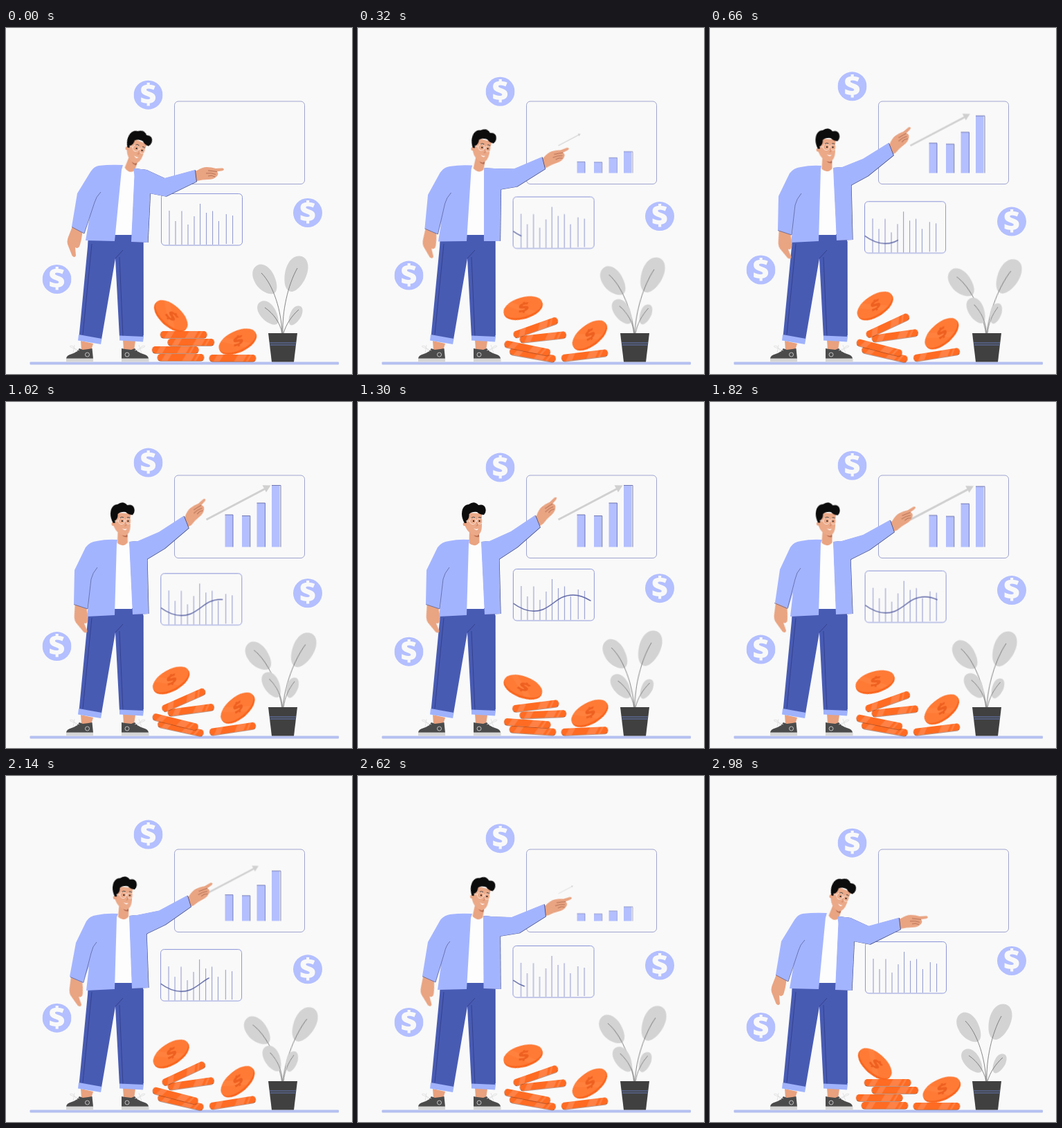
Write an HTML page without scripts that moves like this. It is 500 px wide and 500 px high and loops after 3 s.

```html
<!DOCTYPE html>
<html lang="en">
<head>
<meta charset="utf-8">
<title>Growth presentation</title>
<style>
html, body { margin: 0; width: 100%; height: 100%; overflow: hidden; background: #f9f9f9; }
svg { display: block; width: 100vw; height: 100vh; }
text { font-family: "Open Sans", Arial, sans-serif; font-weight: 800; text-anchor: middle; }

/* floating pieces */
.bob { animation: bob .75s cubic-bezier(.364,0,.636,1) infinite alternate; }
@keyframes bob { to { transform: translate(var(--x, 0px), var(--y)); } }

/* chart */
.bars { transform-origin: 316px 209.5px; animation: rise 3s infinite; }
.arrow { transform-origin: 289.5px 170px; animation: grow 3s infinite; }
@keyframes rise {
  0% { transform: scaleY(0); animation-timing-function: cubic-bezier(.45,0,.35,1); }
  30%, 55.7% { transform: none; animation-timing-function: cubic-bezier(.52,0,.64,1); }
  100% { transform: scaleY(0); }
}
@keyframes grow {
  0% { transform: scale(0); animation-timing-function: cubic-bezier(.45,0,.35,1); }
  30%, 55.7% { transform: none; animation-timing-function: cubic-bezier(.52,0,.64,1); }
  100% { transform: scale(0); }
}
.wave { stroke-dasharray: 1 2; stroke-dashoffset: 1; animation: draw 1.5s cubic-bezier(.364,0,.636,1) infinite alternate; }
@keyframes draw { to { stroke-dashoffset: 0; } }

/* coins and plant */
.coin { animation: toss 1.5s cubic-bezier(.364,0,.636,1) infinite; }
@keyframes toss {
  31%, 63% { transform: translate(0, var(--y)) rotate(var(--r)); }
}
.leaf { transform-origin: 400px 441px; animation: sway 1.5s cubic-bezier(.364,0,.636,1) infinite; }
@keyframes sway { 42.7%, 57.3% { transform: rotate(var(--r)); } }

/* man */
.man * { animation: 3s cubic-bezier(.4,.2,.6,.8) infinite; }
.man .head { animation-name: head; transform-origin: 168px 203px; }
.man .hand { animation-name: hand; transform-origin: 274px 213px; }
.man .rest { animation-name: rest; transform-origin: 103px 292px; }
.man .sleeve { animation-name: sleeve; }
.man .left { animation-name: left; }
.man .right { animation-name: right; }
.man .fold { animation-name: fold; }
@keyframes head {
  0%, 99.6%, 100% { transform: translate(11px, .5px) rotate(20deg); }
  22% { transform: translate(1px, 0) rotate(2deg); }
  43.3% { transform: none; }
  60.7% { transform: translate(1px, 0) rotate(2.5deg); }
  71.3% { transform: translate(1.5px, 0) rotate(3.5deg); }
  87.3% { transform: translate(5px, 0) rotate(11deg); }
}
@keyframes hand {
  0%, 99.6%, 100% { transform: none; }
  22% { transform: translate(-12px, -38px) rotate(-36.5deg); }
  43.3% { transform: translate(-13px, -42px) rotate(-40deg); }
  60.7% { transform: translate(-9px, -34px) rotate(-28.5deg); }
  71.3% { transform: translate(-8.5px, -32px) rotate(-26.5deg); }
  87.3% { transform: translate(-3px, -19px) rotate(-13.5deg); }
}
@keyframes rest {
  0%, 99.6%, 100% { transform: none; }
  22%, 43.3% { transform: translate(5px, 3px) rotate(-18deg); }
  60.7% { transform: translate(0, 2px) rotate(-14deg); }
  71.3% { transform: translate(-1px, 2px) rotate(-14deg); }
  87.3% { transform: translate(-1px, 1.5px) rotate(-10deg); }
}
@keyframes sleeve {
  0%, 99.6%, 100% { d: path("M184 203L203 205L229 217L273 205L275 222L231 243.5L208 239L190 240Z"); }
  22% { d: path("M184 202L191 201L221 189L258 166L265 184L228 214L204 227L190 240Z"); }
  43.3% { d: path("M180 202L190 201L221 187L256 163.5L263 181L230 210L204 227L190 238Z"); }
  60.7% { d: path("M183 202L190 201L221 192L260 170.5L266 188L230 214L204 227L190 240Z"); }
  71.3% { d: path("M183 202L189 201L221 194.5L262 172.5L267 189L230 215L204 227.5L190 240Z"); }
  87.3% { d: path("M184 202.5L190 203L222 204L269 185L271 203L233 227L205 231.5L190 240Z"); }
}
@keyframes left {
  0%, 99.6%, 100% { d: path("M134 199Q150 197 169 198L167 205L157 308L115 307L121 272L113 297L95 287L103 239L122 208Q127 200 134 199Z"); }
  22%, 43.3% { d: path("M131 201Q145 198 161 199L160 204L157 308L117 310L120 288L118 299L98 292L99 243L115 210Q121 202 131 201Z"); }
  60.7% { d: path("M131 201Q145 198 162 199L160 204L157 308L116 310L120 275L113 298L94 290L101 242L116 210Q121 202 131 201Z"); }
  71.3% { d: path("M131 201Q145 198 162 199L160 204L157 308L116 310L120 275L111 299L92 290L101 241L116 210Q121 202 131 201Z"); }
  87.3% { d: path("M133 200Q148 198 165 199L163 205L157 308L115 309L120 273L112 298L93 289L101 240L119 208Q125 201 133 200Z"); }
}
@keyframes right {
  0%, 99.6%, 100% { d: path("M186 203L203 205L209 228L205 310L181 309Z"); }
  22%, 43.3% { d: path("M178 202L190 201L204 226L206 306L183 307Z"); }
  60.7%, 71.3% { d: path("M178 202L189 201L203 226L206 306L182 307Z"); }
  87.3% { d: path("M181 202L192 203L205.5 230L206 308L181.5 307Z"); }
}
@keyframes fold {
  0%, 99.6%, 100% { d: path("M137 237Q130 244 128 252L113 297L95 287.5"); }
  22%, 43.3% { d: path("M132 239Q125 247 123 256L118 299L98 292.5"); }
  60.7%, 71.3% { d: path("M131 240Q125 246 123 256L112 298.5L93 290.5"); }
  87.3% { d: path("M133 239Q127 245 125 255L112 298L93 289.5"); }
}
</style>
</head>
<body>
<svg viewBox="0 0 500 500">
<defs>
  <g id="dollar">
    <circle r="21" fill="#b3bfff"/>
    <text y="13.2" font-size="41" fill="#f9f9f9">$</text>
  </g>
  <g id="flat">
    <rect x="-33.5" y="-4.5" width="67" height="10" rx="4.5" fill="#7a3216"/>
    <rect x="-33.5" y="-5" width="67" height="10" rx="4.5" fill="#ff6b22"/>
    <path d="M-22 -5h9l-6 10h-9zM8 -5h13l-6 10h-13zM25 -5h3l-6 10h-3z" fill="#ff8145"/>
  </g>
  <g id="disc">
    <ellipse cy="1.5" rx="29" ry="14.4" fill="#f9651d"/>
    <ellipse cy="-1.2" rx="28.8" ry="14" fill="#ff7a35"/>
    <path d="M-14 -13L-22 -10 6 12 16 10z" fill="#ff8846" opacity=".5"/>
    <text transform="translate(-1 5.5) skewX(-18) scale(1.1 .7)" font-size="26" fill="#ee6020">$</text>
  </g>
  <clipPath id="panel"><rect x="224.5" y="239.5" width="117" height="74.5" rx="5"/></clipPath>
</defs>

<rect x="34.5" y="482.5" width="446.5" height="4" rx="1" fill="#b5c0f0"/>

<!-- large panel -->
<rect x="243.5" y="106" width="188" height="119.5" rx="5.5" fill="none" stroke="#959bcb" stroke-width=".9"/>
<g class="bars">
  <path d="M316.5 163h11.5v46.5h-11.5zM341 164.5h11.5v45h-11.5zM362.5 146h11.5v63.5h-11.5zM384 120.5h11.5v89h-11.5z" fill="#b3bfff"/>
  <path d="M316.5 163h11.5v46.5M341 164.5h11.8v45M362.5 146h12v63.5M384 120.5h13v89" fill="none" stroke="#575d9d" stroke-width=".8"/>
</g>
<g class="arrow">
  <path d="M289.5 170L376 124.5" stroke="#d0d0d0" stroke-width="3"/>
  <path d="M382.5 120.5L370.5 120.2 376 130.5z" fill="#d0d0d0"/>
</g>

<!-- small panel -->
<g class="bob" style="--x:-1px;--y:11.7px">
  <rect x="224.5" y="239.5" width="117" height="74.5" rx="5" fill="none" stroke="#8c96d8"/>
  <path d="M236 264V313M245 279V313M254 264.5V313M263 284V313M272 272V313M280.6 254V313M289.6 267V313M298.6 264.5V313M307.4 279V313M318.3 269V312M327.6 271V312" stroke="#8d95cd"/>
  <path class="wave" clip-path="url(#panel)" pathLength="1" d="M224.5 289C238 299 253 303 267 298C284 291 290 277 311 277C323 277 333 283 341 288" fill="none" stroke="#5a62a3" stroke-width="1.5"/>
</g>

<g transform="translate(205.5 96.7)"><g class="bob" style="--y:-12.8px"><use href="#dollar"/></g></g>
<g transform="translate(436 267)"><g class="bob" style="--y:13px"><use href="#dollar"/></g></g>
<g transform="translate(73.5 363)"><g class="bob" style="--y:-14px"><use href="#dollar"/></g></g>

<!-- coins -->
<g transform="translate(252.5 476)"><g class="coin" style="--y:-4.5px;--r:13deg"><use href="#flat"/></g></g>
<g transform="translate(244.8 465)"><g class="coin" style="--y:-3px;--r:14.5deg"><use href="#flat"/></g></g>
<g transform="translate(267.3 454)"><g class="coin" style="--y:-9.5px;--r:-8deg"><use href="#flat"/></g></g>
<g transform="translate(256.7 443)"><g class="coin" style="--y:-13px;--r:-25deg"><use href="#flat"/></g></g>
<g transform="translate(238.5 415.9)"><g class="coin" style="--y:-14.5px;--r:-75deg"><g transform="rotate(42)"><use href="#disc"/></g></g></g>
<g transform="translate(327.5 477)"><g class="coin" style="--y:-5px;--r:-9deg"><use href="#flat"/></g></g>
<g transform="translate(334.7 453)"><g class="coin" style="--y:-11.5px;--r:-16deg"><g transform="rotate(-25)"><use href="#disc"/></g></g></g>

<!-- plant -->
<g fill="none" stroke="#6a6a6a" stroke-width=".8">
  <g class="leaf" style="--r:-8.5deg">
    <path d="M363 343C372 338 384 347 389 362C393 373 392 382 386 384C378 386 364 378 359 366C354 356 356 347 363 343z" fill="#d3d3d3" stroke="none"/>
    <path d="M399 441C398 410 387 372 369 354"/>
  </g>
  <g class="leaf" style="--r:8.6deg">
    <path d="M424 329.5C434 330 438 340 436 351C433 366 422 380 413 381C404 381 401 369 403 355C405 341 413 329 424 329.5z" fill="#d3d3d3" stroke="none"/>
    <path d="M400 441C399 410 407 372 421 347"/>
  </g>
  <g class="leaf" style="--r:11deg">
    <path d="M369 395C376 392 385 398 390 409C394 418 395 426 391 428C385 431 373 424 367 415C361 406 362 398 369 395z" fill="#d3d3d3" stroke="none"/>
    <path d="M399 441C396 426 387 413 374 404"/>
  </g>
  <g class="leaf" style="--r:-11deg">
    <path d="M423 401.5C429 402 430 408 427 416C423 424 416 430 412 429.5C407 428 408 419 411 412C414 405 418 401 423 401.5z" fill="#d3d3d3" stroke="none"/>
    <path d="M401 441C405 428 412 417 423 407"/>
  </g>
</g>
<path d="M379 441H421L416 482.5H384z" fill="#404040"/>
<path d="M381 455H419M381.5 458H418.5" stroke="#6a7fc4" stroke-width=".9"/>

<!-- legs and shoes -->
<path d="M108 452L126 456 123 466H109zM169 450L187 452 185 466H170z" fill="#e9a17e"/>
<path d="M106 463L111 465 119 464 124.5 463 126 478H87Q87 473 95 471Q102 469 106 463zM167 463L172 464 181 465 186 463Q191 469 198 471Q206 473 206 478H167z" fill="#4b4b4b"/>
<path d="M87 477.5H126V482.5H87zM167 477.5H206.5V482.5H167z" fill="#d6d6d6"/>
<g fill="none" stroke="#dedede" stroke-width=".8">
  <circle cx="117.5" cy="472" r="3"/><circle cx="175" cy="472" r="3"/>
  <path d="M106 466L93 461Q91 458 97 460L103 468M97 470L99 458M186 466L200 461Q203 458 196 460L190 468M196 470L192 458"/>
</g>
<path d="M119 298L118 316 105.5 446 138 450 158 333 164 447 198.5 447 198 298z" fill="#485bb3"/>
<path d="M124 312L111 443M164 331L169 446M198.2 308V444M158 333L169 321" fill="none" stroke="#2e3c84" stroke-width=".8"/>
<path d="M105 443L138.5 449 137 457 104 451.5zM164 444.5L199 446 198 453.5 164 451.5z" fill="#9fb2fb"/>

<!-- upper body -->
<g class="man">
  <path class="rest" d="M97 284L90 302Q87 309 90 315L95.5 329Q99 333 101 329L100 317Q105 320 107 313L109 305 111 292z" fill="#e9a482"/>
  <path d="M159 203H187L182 299H157z" fill="#fdfdfd"/>
  <g class="head">
    <path d="M161 184L175 188 175.5 203Q169 211 160.5 204z" fill="#e9a482"/>
    <path d="M167 192Q171 194 175 191V195Q170 196 167 192z" fill="#b96e50"/>
    <path d="M156 160L179 161V179Q179 190 172 193.5Q160 192 155 180z" fill="#eba988"/>
    <circle cx="154.5" cy="176.5" r="2.8" fill="#e9a482"/>
    <path d="M154 175Q148 165 151 155Q154 148 160 148Q168 142 174 149Q182 147 184 153Q186 159 182 163Q176 163 172 159Q165 158 160.5 162Q161 168 157.5 171L156.5 175z" fill="#0c0c0c"/>
    <g fill="none" stroke="#fbe9df" stroke-width=".9">
      <circle cx="166" cy="172" r="4.6"/><circle cx="176" cy="172" r="4.2"/><path d="M156 172H161.5"/>
    </g>
    <path d="M164 167.5Q166 165.5 169 167M174 167Q176 166 178 167.5" fill="none" stroke="#222" stroke-width=".9"/>
    <circle cx="167" cy="172" r="1.1"/><circle cx="175.5" cy="172" r="1.1"/>
    <path d="M171.5 173L173 178.5 170.5 179" fill="none" stroke="#c97d5e" stroke-width=".8"/>
    <path d="M167 182.5Q170 184.5 174 183Q172 187.5 167 182.5z" fill="#fff"/>
  </g>
  <path class="left" fill="#a3b4ff"/>
  <path class="fold" fill="none" stroke="#59649f" stroke-width=".8"/>
  <g class="hand">
    <path d="M268 207L276 206Q284 201 290 201Q297 201 303 203L313 202.5Q317 204.5 313 206.2L305 207.5Q308 211 304.5 214.5Q300 219 292 219Q284 219 276 221L268 220z" fill="#e9a482"/>
    <path d="M292 206L305 207.5M289 210Q297 209 303 211.5M292 214Q297 212 302 215" fill="none" stroke="#9c5b42" stroke-width=".7"/>
  </g>
  <path class="sleeve" transform="translate(.9 .3)" fill="#3f4876"/>
  <path class="right" transform="translate(.6 0)" fill="#3f4876"/>
  <path class="right" fill="#a3b4ff"/>
  <path class="sleeve" fill="#a3b4ff"/>
</g>
</svg>
</body>
</html>
```
